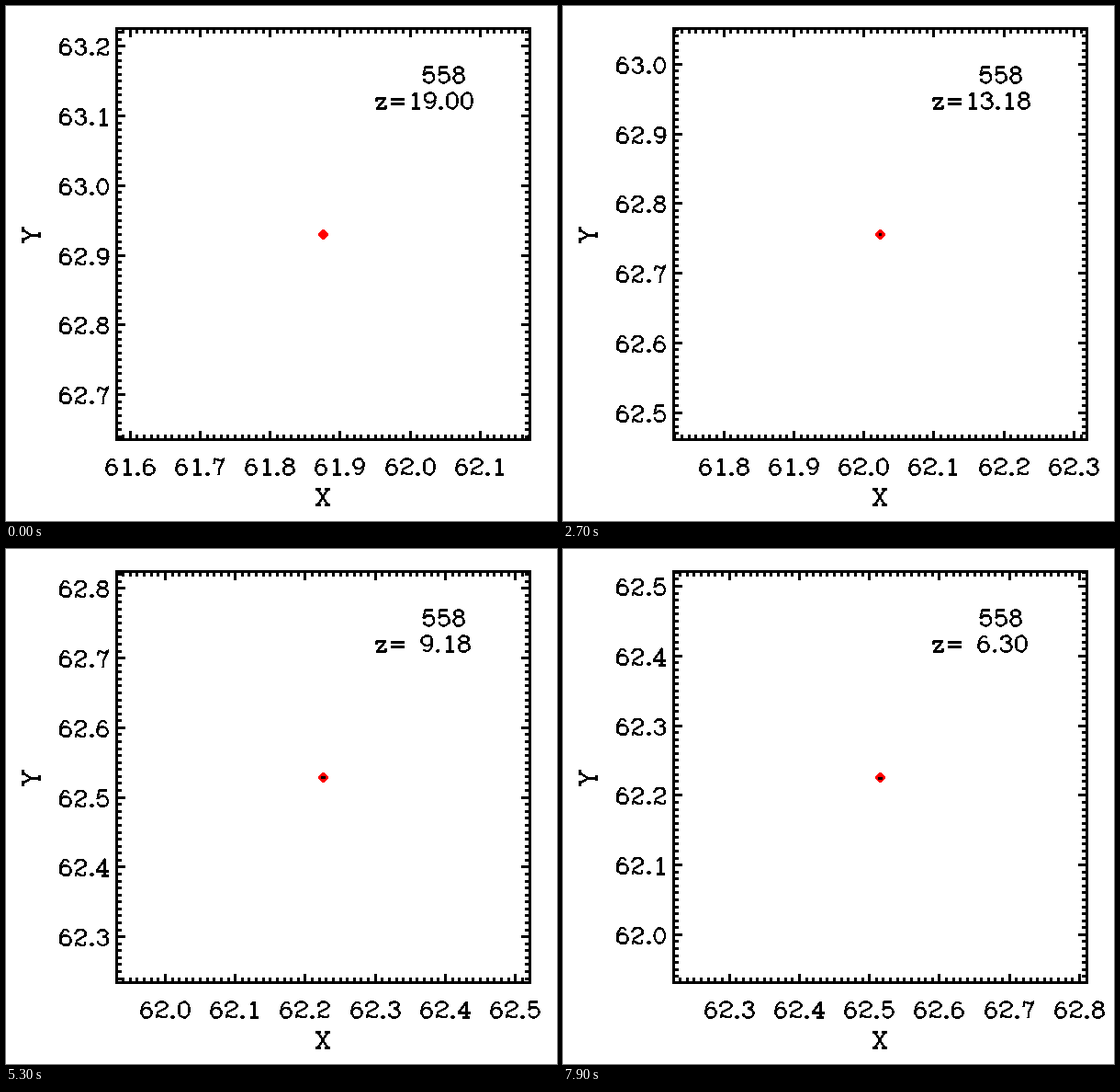
These frames come from a looping animation (600x560 px, 8000 ms). A matplotlib script:

```python
import numpy as np
import matplotlib.pyplot as plt
from matplotlib.animation import FuncAnimation
from matplotlib.collections import LineCollection
from matplotlib.patches import Polygon, Rectangle

W, H, DPI = 600, 560, 100
FRAMES, STEP_MS = 80, 100
LEFT, RIGHT, TOP, BOTTOM = 120.5, 570.5, 24.5, 471.5
SPAN = 0.59                      # data width and height of the window
UNIT = 0.81                      # pixels per stroke-font unit
PX = 72 / DPI


def arc(cx, cy, rx, ry, a, b):
    t = np.radians(np.linspace(a, b, max(4, int(abs(b - a) / 18))))
    return list(zip(cx + rx * np.cos(t), cy + ry * np.sin(t)))


def oval(cx, cy, rx, ry):
    return arc(cx, cy, rx, ry, 0, 360)


def bar(cx, y, half):
    return [(cx - half, y), (cx + half, y)]


def flip(strokes):
    """Half turn about the middle of a digit."""
    return [[(-x, -3 - y) for x, y in s] for s in strokes]


# Serif stroke font: y points down, caps run from -12 to 9
SIX = [oval(0, 2.5, 7, 6.5), arc(0, 0, 7, 12, 165, 310)]
GLYPHS = {
    " ": [],
    ".": [oval(0, 8, 1, 1)],
    "=": [bar(0, -3, 9), bar(0, 3, 9)],
    "0": [oval(0, -1.5, 7, 10.5)],
    "1": [[(-4, -8), (1, -12), (1, 9)], bar(1, 9, 5)],
    "2": [arc(0, -7, 7, 5, -190, 50) + [(-5, 2), (-7, 9)],
          [(-7, 7), (-4, 6), (2, 9), (6, 8), (7, 5)]],
    "3": [arc(0, -7.5, 6, 4.5, -180, 90), arc(0, 3, 7, 6, -90, 170)],
    "4": [[(3, 9), (3, -12), (-8, 3), (8, 3)], bar(3, 9, 4)],
    "5": [[(5, -12), (-5, -12), (-7, -2)] + arc(0, 2, 7, 7, -140, 165)],
    "6": SIX,
    "7": [[(-7, -6), (-5, -12), (3, -9), (7, -12), (1, 0), (0, 9)]],
    "8": [oval(0, -7.5, 6, 4.5), oval(0, 3, 7, 6)],
    "9": flip(SIX),
    "z": [[(-6, -1), (-6, -5), (6, -5), (-6, 9), (6, 9), (6, 5)]],
    "X": [[(-7, -12), (7, 9)], [(7, -12), (-7, 9)]]
         + [bar(x, y, 3) for x in (-6, 6) for y in (-12, 9)],
    "Y": [[(-7, -12), (0, -1), (7, -12)], [(0, -1), (0, 9)],
          bar(-7, -12, 3), bar(7, -12, 3), bar(0, 9, 3)],
}
ADVANCE = {".": 10, " ": 16, "=": 26, "z": 18}


def snap(v):
    return np.floor(v) + 0.5


def text(s, x, base, align=0.0, turned=False):
    """Strokes of s; align 0, 0.5 or 1 sets left, centre or right."""
    widths = [ADVANCE.get(c, 20) for c in s]
    pen = -align * sum(widths)
    out = []
    for c, w in zip(s, widths):
        for stroke in GLYPHS[c]:
            p = np.array(stroke, float)
            u = (p[:, 0] + pen + w / 2) * UNIT
            v = (p[:, 1] - 9) * UNIT
            pts = (x + v, base - u) if turned else (x + u, base + v)
            out.append(snap(np.column_stack(pts)))
        pen += w
    return out


def redshift(k):
    """Nearly even steps in log scale factor."""
    return 20 * np.exp(-k * (0.01272 + 5e-7 * k)) - 1


# Key times of the path; it runs almost evenly in scale factor
KEYS = np.array([0, 11, 20, 34, 44, 62, 79])
CX = [61.8758, 61.9310, 61.9784, 62.0725, 62.1482, 62.3126, 62.5155]
CY = [62.9306, 62.8661, 62.8082, 62.6992, 62.6108, 62.4376, 62.2262]


def centre(k):
    a, keys = 1 / (1 + redshift(k)), 1 / (1 + redshift(KEYS))
    return np.interp(a, keys, CX), np.interp(a, keys, CY)


def grid(mid):
    """Hundredths inside the window, with their place from 0 to 1."""
    lo = mid - SPAN / 2
    for n in range(int(np.ceil(lo * 100)), int((lo + SPAN) * 100) + 1):
        yield n, (n / 100 - lo) / SPAN


fig = plt.figure(figsize=(W / DPI, H / DPI), dpi=DPI, facecolor="white")
ax = fig.add_axes([0, 0, 1, 1])
ax.set(xlim=(0, W), ylim=(H, 0))
ax.axis("off")

CRISP = dict(antialiased=False, snap=False)


def pen_layer(width):
    layer = LineCollection([], colors="black", linewidths=width * PX,
                           capstyle="butt", **CRISP)
    ax.add_collection(layer, autolim=False)
    return layer


ticks, words = pen_layer(3), pen_layer(1.05)
ax.add_patch(Polygon([(LEFT, TOP), (RIGHT, TOP), (RIGHT, BOTTOM), (LEFT, BOTTOM)],
                     fill=False, ec="black", lw=3 * PX, joinstyle="miter", **CRISP))

MX, MY, R = 345.5, 248.5, 5.2
ax.add_patch(Polygon([(MX - R, MY), (MX, MY - R), (MX + R, MY), (MX, MY + R)],
                     fc="red", ec="none", zorder=4, **CRISP))
core = Rectangle((0, 0), 3, 3, fc="black", ec="none", zorder=5, **CRISP)
ax.add_patch(core)

FIXED = (text("558", 452.5, 83.5) + text("X", 345, 542.5, 0.5)
         + text("Y", 36, 249, 0.5, turned=True))


def draw(k):
    cx, cy = centre(k)
    marks = []
    strokes = FIXED + text(f"z={redshift(k):5.2f}", 401.5, 111.5)
    for n, f in grid(cx):
        x = snap(LEFT + f * (RIGHT - LEFT))
        size = 5 if n % 10 else 9.5
        marks += [[(x, BOTTOM), (x, BOTTOM - size)], [(x, TOP), (x, TOP + size)]]
        if n % 10 == 0:
            strokes += text(f"{n / 100:.1f}", x, 509.5, 0.5)
    for n, f in grid(cy):
        y = snap(BOTTOM - f * (BOTTOM - TOP))
        size = 5 if n % 10 else 9.5
        marks += [[(LEFT, y), (LEFT + size, y)], [(RIGHT, y), (RIGHT - size, y)]]
        if n % 10 == 0:
            base = np.clip(y + 9.5, TOP + 17.5, BOTTOM)
            strokes += text(f"{n / 100:.1f}", 113.5, base, 1)
    ticks.set_segments(marks)
    words.set_segments(strokes)

    # The dark core shows up late, then widens and wobbles
    late = k > 50
    width = 5 if late else 3
    dy = -np.cos((k - 62) * np.pi / 17) if late else 0
    core.set_visible(k >= 27)
    core.set_width(width)
    core.set_xy((MX - width / 2, MY - 1.5 + round(dy)))
    return ticks, words, core


anim = FuncAnimation(fig, draw, frames=FRAMES, interval=STEP_MS,
                     repeat=True, repeat_delay=0, blit=False)
plt.show()
```
